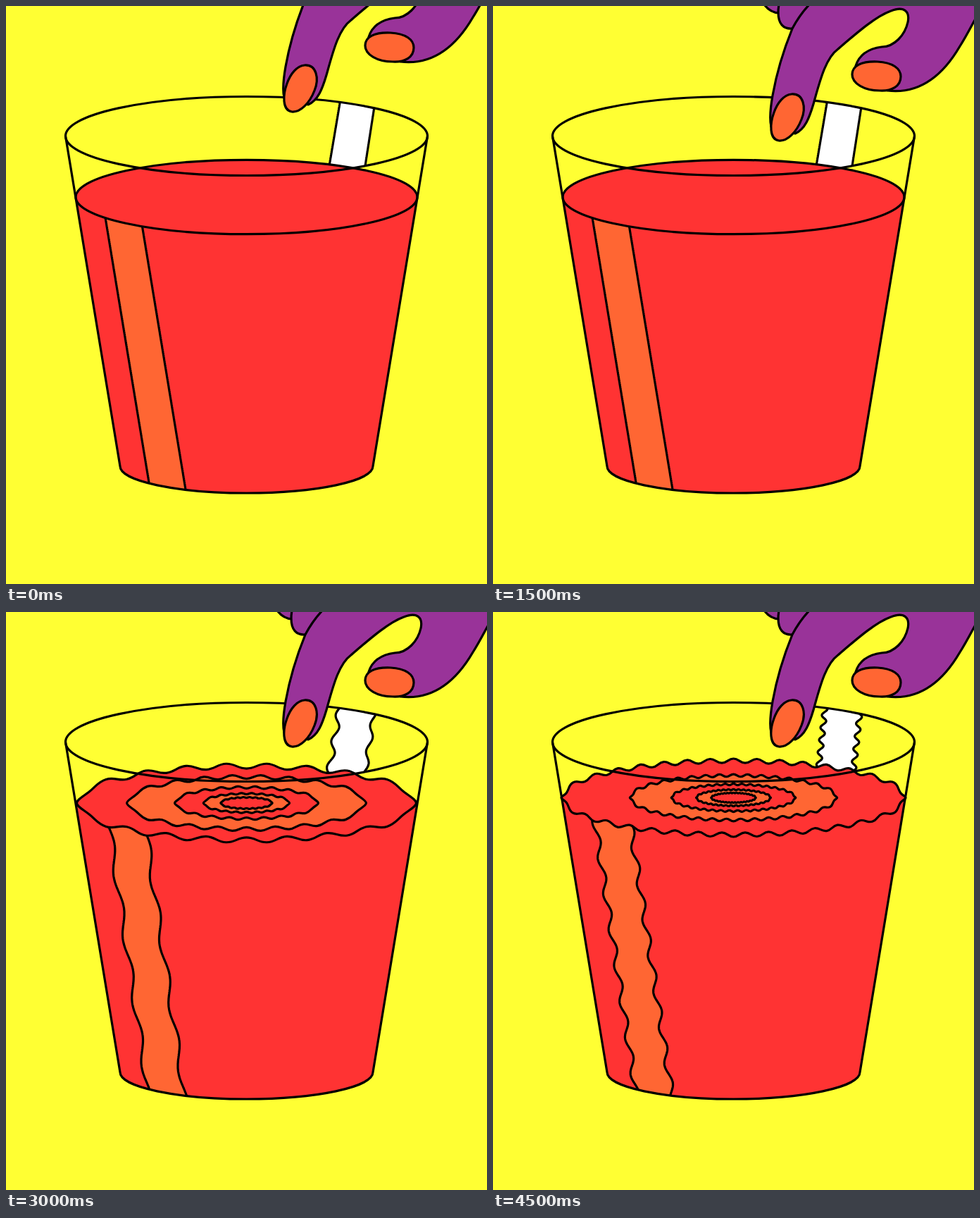
Write an HTML page that moves like this. It is 683 by 820 pixels and loops after 5 s.

```html
<!DOCTYPE html>
<html lang="en">
<head>
<meta charset="utf-8">
<title>Tapped glass</title>
<style>
html, body { margin: 0; width: 100%; height: 100%; overflow: hidden; background: #ff3; }
svg { display: block; width: 100vw; height: 100vh; }
.ink { stroke: #000; stroke-width: 3.2; stroke-linejoin: round; stroke-linecap: round; }
.none { fill: none; }
.red { fill: #f33; }
.orange { fill: #f63; }
.purple { fill: #939; }
.white { fill: #fff; }
</style>
</head>
<body>
<svg viewBox="0 0 683 820">
  <defs>
    <clipPath id="mouth"><ellipse cx="341.5" cy="184.5" rx="257" ry="56"/></clipPath>
    <clipPath id="cup"><path d="M84.5 184.5L162 653A179.5 38 0 0 0 521 653L598.5 184.5Z"/></clipPath>
  </defs>
  <g id="liquids"></g>
  <g class="ink none">
    <ellipse cx="341.5" cy="184.5" rx="257" ry="56"/>
    <path d="M84.5 184.5L162 653A179.5 38 0 0 0 521 653L598.5 184.5"/>
  </g>
  <g id="hand" class="ink purple">
    <path d="M380 -90L374 0C374 30 388 50 406 51L470 20L700 -90Z"/>
    <path d="M470 -60C430 -20 405 20 405 50C405 66 412 74 425 73L560 20L700 40L760 -90Z"/>
    <path d="M760 -25L580 -20C500 -8 452 22 425 73C412 105 402 140 397 168C394 185 392 200 395 212
      L429 222C443 216 449 200 455 180C464 148 472 115 490 102C520 76 545 55 565 48
      C585 40 592 50 589 64C585 82 570 99 552 99C530 102 519 113 515 126
      L560 161C610 167 642 134 663 98C672 84 680 68 690 50Z"/>
    <path class="orange" d="M424 166C441 165 445 185 438 202C431 220 418 233 406 232C392 230 393 208 399 192C404 178 413 167 424 166Z"/>
    <path class="orange" d="M510 138C510 126 523 119 546 120C568 121 579 130 579 141C579 155 566 162 549 161C527 161 510 151 510 138Z"/>
  </g>
</svg>
<script>
const CX = 341.5;
const STEP = 500;

// An edge is a slanted line [x, y, slope] plus a wave [half period, y of a right-hand bulge, amplitude].
const STATES = {
  calm: {
    cy: 271,
    straw: [[474, 138, -0.169, 1, 0, 0], [522.5, 146, -0.155, 1, 0, 0]],
    stripe: [[141, 300, 0.165, 1, 0, 0], [193.5, 313, 0.165, 1, 0, 0]]
  },
  slow: {
    cy: 271, waves: 9, spacing: 28.6, sign: -1, amp: 3.6, rx: 242, tip: 241, ring: 0.705,
    straw: [[473.5, 138, -0.169, 18.5, 164, 4], [522.5, 146, -0.155, 18.5, 178.5, 3.2]],
    stripe: [[151.7, 340, 0.147, 45, 330, 4], [203.4, 345, 0.147, 45, 337, 4]]
  },
  fast: {
    cy: 263.5, waves: 16, spacing: 16.5, sign: 1, amp: 3, rx: 243, tip: 244.5, ring: 0.602,
    straw: [[469, 160, -0.11, 8.75, 155, 3.6], [519, 160, -0.11, 9, 149, 3.6]],
    stripe: [[148.2, 320, 0.152, 25.5, 631, 4], [244, 620, 0.153, 25.5, 617, 4]]
  }
};

// Liquid state and vertical hand offset for each half second.
const TIMELINE = [
  ['calm', -82], ['calm', -41], ['calm', 0], ['calm', -41],
  ['slow', -41], ['fast', -41], ['slow', -41], ['fast', -41], ['slow', -41], ['fast', -41]
];

const path = (d, cls) => `<path class="ink ${cls}" d="${d}"/>`;

function edge([x, y, slope, half, phase, amp], top, bottom) {
  const points = [];
  for (let at = top; at <= bottom; at++) {
    const sway = amp * Math.cos(Math.PI * (at - phase) / half);
    points.push([x + slope * (at - y) + sway, at]);
  }
  return points;
}

function band([left, right], top, bottom, cls) {
  const outline = edge(left, top, bottom).concat(edge(right, top, bottom).reverse());
  return path('M' + outline.map(p => p.map(v => v.toFixed(1)).join(' ')).join('L') + 'Z', cls);
}

// Bulges sit at equal distances along the ellipse, starting from its top.
function rippleOutline({ waves, spacing, sign, amp, rx, tip }) {
  const ry = 52.5;
  const quarter = [];
  let angle = 0, length = 0;
  for (let i = 0; i < waves; i++) {
    while (length < i * spacing) {
      length += 0.001 * Math.hypot(rx * Math.cos(angle), ry * Math.sin(angle));
      angle += 0.001;
    }
    const s = Math.sin(angle), c = Math.cos(angle);
    const push = amp * sign * (i % 2 ? -1 : 1) / Math.hypot(s / rx, c / ry);
    quarter.push([rx * s + push * s / rx, -ry * c - push * c / ry]);
  }
  const rest = quarter.slice(1);
  const flip = (list, sx, sy) => list.map(([x, y]) => [x * sx, y * sy]);
  return [
    ...quarter, [tip, 0],
    ...flip(rest, 1, -1).reverse(), ...flip(quarter, -1, -1),
    [-tip, 0], ...flip(rest, -1, 1).reverse()
  ];
}

function smooth(points, scale, cy) {
  const n = points.length;
  const at = i => points[(i + n) % n];
  const put = (x, y) => `${(CX + x * scale).toFixed(2)} ${(cy + y * scale).toFixed(2)} `;
  const handle = (i, other, dir) => {
    const [x, y] = at(i), [px, py] = at(i - 1), [qx, qy] = at(i + 1), [ox, oy] = at(other);
    const pull = Math.abs(y) < 0.01 ? 0.2 : 0.42;
    const k = dir * pull * Math.hypot(ox - x, oy - y) / Math.hypot(qx - px, qy - py);
    return put(x + (qx - px) * k, y + (qy - py) * k);
  };
  let d = 'M' + put(...at(0));
  for (let i = 0; i < n; i++) {
    d += 'C' + handle(i, i + 1, 1) + handle(i + 1, i, -1) + put(...at(i + 1));
  }
  return d + 'Z';
}

function surface(state) {
  if (!state.waves) {
    return `<ellipse class="ink red" cx="${CX}" cy="${state.cy}" rx="242.5" ry="52.7"/>`;
  }
  const outline = rippleOutline(state);
  const scales = [1, ...[0, 1, 2, 3].map(i => state.ring * 0.6 ** i)];
  return scales.map((s, i) => path(smooth(outline, s, state.cy), i % 2 ? 'orange' : 'red')).join('');
}

function liquid(name) {
  const s = STATES[name];
  return `<g id="${name}">
    <g clip-path="url(#mouth)">${band(s.straw, 125, 250, 'white')}</g>
    <g clip-path="url(#cup)">
      <rect class="red" x="80" y="${s.cy}" width="523" height="430"/>
      ${band(s.stripe, s.cy + 10, 700, 'orange')}
    </g>
    ${surface(s)}</g>`;
}

const names = Object.keys(STATES);
document.getElementById('liquids').innerHTML = names.map(liquid).join('');
const groups = names.map(name => document.getElementById(name));
const hand = document.getElementById('hand');

function draw(now) {
  const [name, dy] = TIMELINE[Math.floor(now / STEP) % TIMELINE.length];
  for (const g of groups) g.style.display = g.id === name ? '' : 'none';
  hand.setAttribute('transform', `translate(0 ${dy})`);
}

let start = null;
function tick(now) {
  start ??= now;
  draw(now - start);
  requestAnimationFrame(tick);
}
draw(0);
requestAnimationFrame(tick);
</script>
</body>
</html>
```
